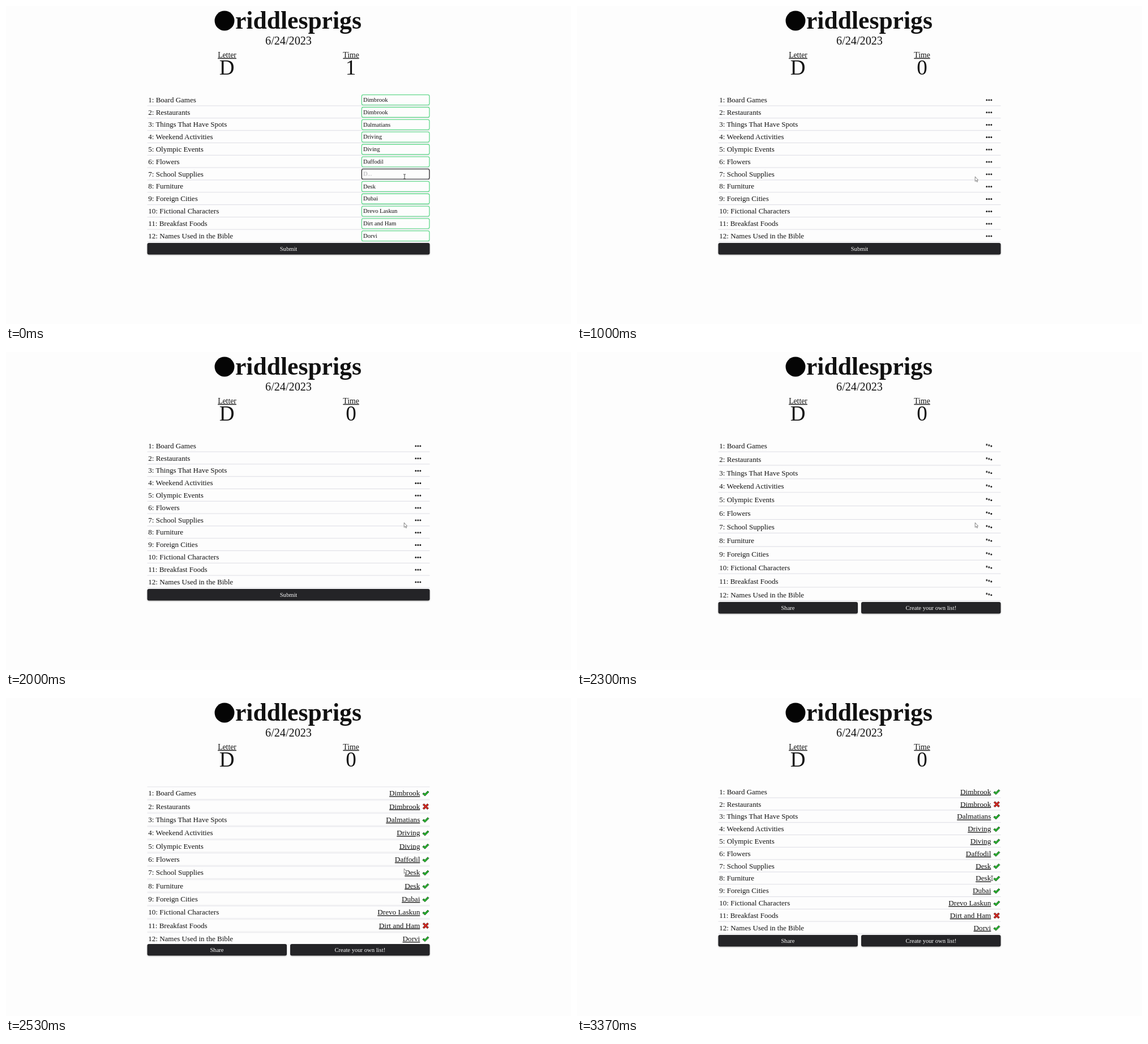
An HTML page that plays this animation: 998 by 561 pixels, repeating every 3410 ms.

```html
<!DOCTYPE html>
<html lang="en">
<head>
<meta charset="utf-8">
<title>Word game round</title>
<style>
@property --first { syntax: "<length>"; inherits: true; initial-value: 165.5px; }
@property --pitch { syntax: "<length>"; inherits: true; initial-value: 21.82px; }
@property --drop { syntax: "<length>"; inherits: true; initial-value: 0px; }

html, body { margin: 0; width: 100%; height: 100%; overflow: hidden; background: #fdfdfd; }
svg { display: block; }
#stage {
  width: 998px; height: 561px;
  font: 13px "Liberation Serif", "Times New Roman", serif;
  fill: #111;
  animation: layout 3410ms linear infinite;
}
.mid { text-anchor: middle; }
.end { text-anchor: end; }
.under { text-decoration: underline; }
.title { font-size: 43.6px; font-weight: bold; }
.date { font-size: 20.2px; }
.head { font-size: 13.7px; }
.big { font-size: 37px; }
.small { font-size: 10.6px; }
.answer { font-size: 13.2px; }

.row { transform: translateY(calc(var(--first) + var(--i) * var(--pitch))); }
.buttons { transform: translateY(var(--drop)); }
.buttons rect { fill: #242427; filter: drop-shadow(0 1px 1.2px #0004); }
.buttons text { fill: #fafafa; }
.rule { stroke: #dcdce3; animation: rule 3410ms step-end infinite; }
.rule.top { animation-name: top-rule; }
.box { fill: #fdfdfd; stroke: #63d88c; stroke-width: 1.3; }
.box.focus { animation: valid 3410ms linear infinite; }
.hint { fill: #a6a6aa; animation: hint 3410ms step-end infinite; }
.key { opacity: 0; animation: key 3410ms step-end calc(90ms + var(--k) * 130ms) infinite; }
.dot { animation: bounce 3410ms calc(var(--k) * 100ms) infinite; }

.playing, .over, .submit, .share, .loading, .result, .bar, .arrow {
  animation: 3410ms step-end infinite;
}
.playing { animation-name: playing; }
.over { animation-name: over; }
.submit { animation-name: submit; }
.share { animation-name: share; }
.loading { animation-name: loading; }
.result { animation-name: result; }
.bar { animation-name: bar; }
.arrow { animation-name: arrow; }
.pointer { animation: point 3410ms ease-in-out infinite; }

@keyframes playing { 0% { opacity: 1 } 26.39%, 100% { opacity: 0 } }
@keyframes over { 0% { opacity: 0 } 26.39%, 100% { opacity: 1 } }
@keyframes submit { 0% { opacity: 1 } 63.05%, 100% { opacity: 0 } }
@keyframes share { 0% { opacity: 0 } 63.05%, 100% { opacity: 1 } }
@keyframes loading { 0% { opacity: 0 } 26.39% { opacity: 1 } 73.31%, 100% { opacity: 0 } }
@keyframes result { 0% { opacity: 0 } 73.31%, 100% { opacity: 1 } }
@keyframes bar { 0% { opacity: 1 } 26.39% { opacity: 0 } 95%, 100% { opacity: 1 } }
@keyframes arrow { 0% { opacity: 0 } 26.39% { opacity: 1 } 95%, 100% { opacity: 0 } }
@keyframes rule { 0% { opacity: 1 } 73.31% { opacity: .5 } 85.04%, 100% { opacity: 1 } }
@keyframes top-rule { 0% { opacity: 0 } 73.31% { opacity: .8 } 77.5%, 100% { opacity: 0 } }
@keyframes hint { 0% { opacity: 1 } 2.64%, 100% { opacity: 0 } }
@keyframes key { 0% { opacity: 1 } 60%, 100% { opacity: 0 } }
@keyframes valid { 0%, 2.64% { stroke: #27272a } 7%, 100% { stroke: #63d88c } }
@keyframes point {
  0%, 89% { transform: translate(704px, 301px) }
  98%, 100% { transform: translate(733px, 318px) }
}
@keyframes bounce {
  0%, 48.97%, 79.77%, 100% { transform: none }
  31.38%, 62.17% { transform: none; animation-timing-function: cubic-bezier(.33, .66, .66, 1) }
  40.18%, 70.97% { transform: translateY(-3px); animation-timing-function: cubic-bezier(.33, 0, .66, .33) }
}
@keyframes layout {
  0%, 63.04% { --first: 165.5px; --pitch: 21.82px; --drop: 0px }
  63.05%, 73.3% { --first: 165.5px; --pitch: 23.9px; --drop: 23px }
  73.31% { --first: 168.4px; --pitch: 23.2px; --drop: 14.5px }
  74.19% { --first: 168px; --pitch: 23.34px; --drop: 16px }
  79.18% { --first: 166px; --pitch: 24.24px; --drop: 27px }
  85.03% { --first: 165.5px; --pitch: 24.4px; --drop: 28.5px }
  85.04%, 100% { --first: 165.5px; --pitch: 21.82px; --drop: 0px }
}
</style>
</head>
<body>
<svg id="stage" viewBox="0 0 998 561">
  <defs>
    <path id="yes" d="M-5.5 1 -3.3 -1 -1.3 .8 3.6 -4.2 5.6 -2.2 -1.2 4.6Z"
      fill="#27b82f" stroke="#164d18" stroke-width=".9" stroke-linejoin="round"/>
    <path id="no" d="M-3 -5 0 -2 3 -5 5 -3 2 0 5 3 3 5 0 2 -3 5 -5 3 -2 0 -5 -3Z"
      fill="#d8261f" stroke="#571311" stroke-width=".9" stroke-linejoin="round"/>
  </defs>

  <circle cx="386" cy="26" r="17.5" fill="#050505"/>
  <text class="title" x="405" y="39.5">riddlesprigs</text>
  <text class="date mid" x="499" y="67.5">6/24/2023</text>
  <text class="head mid under" x="390.5" y="90.8">Letter</text>
  <text class="head mid under" x="609.5" y="90.8">Time</text>
  <text class="big mid" x="390" y="121">D</text>
  <text class="big mid playing" x="609" y="121">1</text>
  <text class="big mid over" x="609.5" y="121">0</text>

  <g id="rows"></g>

  <g class="buttons">
    <g class="submit">
      <rect x="249.5" y="418" width="499" height="20.5" rx="3"/>
      <text class="small mid" x="499" y="431.7">Submit</text>
    </g>
    <g class="share">
      <rect x="249.5" y="418" width="246.5" height="20.5" rx="3"/>
      <rect x="502" y="418" width="246.5" height="20.5" rx="3"/>
      <text class="small mid" x="372.5" y="431.7">Share</text>
      <text class="small mid" x="625.3" y="431.7">Create your own list!</text>
    </g>
  </g>

  <g class="pointer">
    <path class="bar" d="M-2 -4H-.6Q0 -4 0 -3.4Q0 -4 .6 -4H2M0 -3.4V3.4M-2 4H-.6Q0 4 0 3.4Q0 4 .6 4H2"
      fill="none" stroke="#333" stroke-width=".9"/>
    <path class="arrow" d="M-.8 0V8.4L1.1 6.6 2.4 9.5 3.6 9 2.4 6.2H4.6Z"
      fill="#fff" stroke="#555" stroke-width=".7"/>
  </g>
</svg>

<script>
const rounds = [
  ["Board Games", "Dimbrook"],
  ["Restaurants", "Dimbrook", "no"],
  ["Things That Have Spots", "Dalmatians"],
  ["Weekend Activities", "Driving"],
  ["Olympic Events", "Diving"],
  ["Flowers", "Daffodil"],
  ["School Supplies", "Desk"],
  ["Furniture", "Desk"],
  ["Foreign Cities", "Dubai"],
  ["Fictional Characters", "Drevo Laskun"],
  ["Breakfast Foods", "Dirt and Ham", "no"],
  ["Names Used in the Bible", "Dorvi"]
];
const typedRow = 6;

const rule = (y, cls = "") =>
  `<line class="rule ${cls}" x1="249.5" x2="748.5" y1="${y}" y2="${y}"/>`;

const entry = (word, typed) => {
  const letters = [...word].map((c, k) => `<tspan class="key" style="--k:${k}">${c}</tspan>`);
  // Each typed letter is its own text so that it can appear alone.
  const widths = [0, 7.65, 12.36, 16.48];
  const text = typed
    ? `<text class="small hint" x="631" y="3.4">D...</text>` + [...word].map((c, k) =>
        `<text class="small key" style="--k:${k}" x="${631 + widths[k]}" y="3.4">${c}</text>`).join("")
    : `<text class="small" x="631" y="3.4">${word}</text>`;
  return `<g class="playing">
    <rect class="box ${typed ? "focus" : ""}" x="628.3" y="-8.8" width="119.6" height="18" rx="2.8"/>${text}</g>`;
};

const dots = [0, 1, 2].map(k =>
  `<circle class="dot" style="--k:${k}" cx="${723.8 + 4 * k}" cy=".4" r="1.5"/>`).join("");

document.getElementById("rows").innerHTML = rounds.map(([label, word, mark = "yes"], i) => `
  <g class="row" style="--i:${i}">
    ${rule(-11.2, "top")}${rule(10.4)}
    <text x="251.3" y="4.2">${i + 1}: ${label}</text>
    ${entry(word, i === typedRow)}
    <g class="loading">${dots}</g>
    <g class="result">
      <text class="answer end under" x="731.3" y="4.2">${word}</text>
      <use href="#${mark}" x="741.3" y=".2"/>
    </g>
  </g>`).join("");
</script>
</body>
</html>
```
